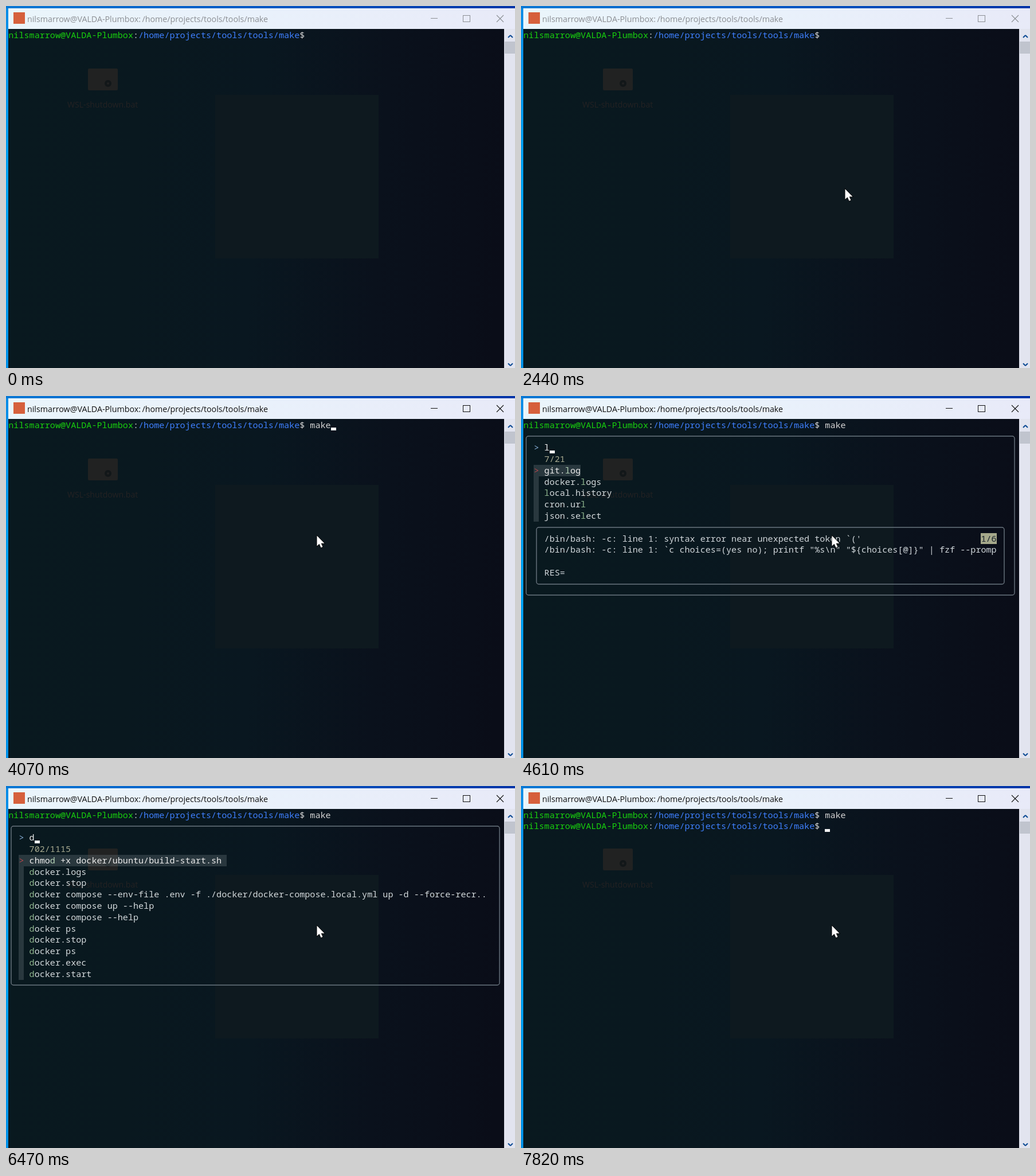
Write an HTML page with a canvas that moves like this. It is 888 by 631 pixels and loops after 8 s.

```html
<!DOCTYPE html>
<html lang="en">
<head>
<meta charset="utf-8">
<title>Terminal</title>
<style>
  html, body { margin: 0; width: 100%; height: 100%; overflow: hidden; background: #091720; }
  canvas { display: block; }
</style>
</head>
<body>
<canvas id="stage" width="888" height="631"></canvas>
<script>
const ctx = document.getElementById('stage').getContext('2d');
const LOOP = 8000, CELL = 9.07, LINE = 19.8, LEFT = 4.3, TOP = 40.5;
const MONO = '15.1px "Noto Sans Mono", monospace';
const USER = 'nilsmarrow@VALDA-Plumbox', PATH = '/home/projects/tools/tools/make';

const bashError = [
  "/bin/bash: -c: line 1: syntax error near unexpected token `('",
  '/bin/bash: -c: line 1: `c choices=(yes no); printf "%s\\n" "${choices[@]}" | fzf --promp',
  '', 'RES='];
const gitLog = ['git log --oneline --graph --all'];
const tacHistory = ['history -w; tac ~/.bash_history | fzf +s --exact | tee -a ~/.bash_history | bash'];

const tasks = ['fzf.choice', 'git.log', 'docker.logs', 'local.history', 'cron.url'];
const withL = ['git.log', 'docker.logs', 'local.history', 'cron.url', 'json.select'];
const local = ['local.history'];
const recent = ['make', 'git status', 'docker ps', 'docker.stop', 'git.log', 'cd ..', 'ls -la',
  'docker compose --help', 'cron.url', 'git pull', 'docker.start'];
const docker = ['chmod +x docker/ubuntu/build-start.sh ', 'docker.logs', 'docker.stop',
  'docker compose --env-file .env -f ./docker/docker-compose.local.yml up -d --force-recr..',
  'docker compose up --help', 'docker compose --help', 'docker ps', 'docker.stop', 'docker ps',
  'docker.exec', 'docker.start'];

// start time, query, counter, list, preview, cursor hidden
const finder = [
  [4340, '', '21/21', tasks, []],
  [4410, '', '21/21', tasks, bashError],
  [4610, 'l', '7/21', withL, bashError],
  [4680, 'l', '7/21', withL, gitLog],
  [4810, 'lo', '3/21', withL.slice(0, 3), gitLog],
  [5010, 'loc', '1/21', local, gitLog],
  [5080, 'loc', '1/21', local, tacHistory],
  [5280, 'loca', '1/21', local, tacHistory],
  [5480, 'loca', '1/21', local, tacHistory, true],
  [5940, '', '', []],
  [6010, '', '1115/1115', recent],
  [6470, 'd', '702/1115', docker],
  [6610, 'do', '215/1115', docker],
  [6740, 'doc', '118/1115', docker],
  [6810, 'dock', '118/1115', docker],
  [6880, 'dock', '112/1115', docker],
  [7080, 'dock', '112/1115', docker, null, true]];

const colX = col => LEFT + col * CELL;
const rowY = row => TOP + row * LINE;

function rect(x, y, w, h, color) {
  ctx.fillStyle = color;
  ctx.fillRect(x, y, w, h);
}

function gradient(x, y, x2, y2, ...colors) {
  const g = ctx.createLinearGradient(x, y, x2, y2);
  colors.forEach((c, i) => g.addColorStop(i / (colors.length - 1), c));
  return g;
}

function label(text, x, y, size, color) {
  ctx.font = size + 'px "Open Sans", sans-serif';
  ctx.fillStyle = color;
  ctx.fillText(text, x, y);
}

// Writes text on the character grid and returns the next column.
function put(text, col, row, color) {
  ctx.font = MONO;
  ctx.fillStyle = color;
  const y = Math.round(rowY(row) + 15.1);
  for (const ch of text) ctx.fillText(ch, colX(col++), y);
  return col;
}

function line(color, width, ...points) {
  ctx.strokeStyle = color;
  ctx.lineWidth = width;
  ctx.beginPath();
  for (let i = 0; i < points.length; i += 4) {
    ctx.moveTo(points[i], points[i + 1]);
    ctx.lineTo(points[i + 2], points[i + 3]);
  }
  ctx.stroke();
}

function frame(col, row, col2, row2) {
  const [x, x2] = [col, col2].map(c => Math.round(colX(c + .5)));
  const [y, y2] = [row, row2].map(r => Math.round(rowY(r + .5)));
  ctx.strokeStyle = '#6a757f';
  ctx.lineWidth = 1.4;
  ctx.beginPath();
  ctx.roundRect(x, y, x2 - x, y2 - y, 4);
  ctx.stroke();
}

function caret(col, row) {
  rect(Math.round(colX(col)), Math.round(rowY(row) + 14.6), 9, 5, '#f2f2f2');
}

function prompt(row) {
  let col = put(USER, 0, row, '#18d00e');
  col = put(':', col, row, '#d4d4d4');
  col = put(PATH, col, row, '#3f80ff');
  put('$', col, row, '#d4d4d4');
}

function drawWindow(active) {
  rect(0, 0, 888, 631, gradient(0, 0, 0, 631, '#0a8ce6', '#00a2f2', '#0090e8'));
  rect(0, 0, 888, 4, gradient(0, 0, 888, 0, '#0878d4', '#0458c4', '#0436a8'));
  rect(4, 4, 884, 36, gradient(4, 0, 888, 0, '#eaf5fb', '#e9f1fb', '#e8eaf8'));
  rect(4, 40, 865, 591, gradient(4, 300, 869, 360, '#09191f', '#09181f', '#091720', '#0a111c', '#0a0d18'));
  rect(365, 155, 285, 285, '#0e191f');

  ctx.fillStyle = '#212222';
  ctx.beginPath();
  ctx.roundRect(143, 109, 52, 38, 2);
  ctx.fill();
  ctx.strokeStyle = '#121719';
  ctx.lineWidth = 4;
  ctx.beginPath();
  ctx.arc(178, 135, 4, 0, 7);
  ctx.stroke();
  label('WSL-shutdown.bat', 107, 177, 14.1, '#242223');

  rect(13, 11, 20, 20, '#d6603c');
  const ink = active ? '#111' : '#8c8f94';
  label(USER + ':', 37, 28, 14.25, ink);
  label(PATH, 237.5, 28, 14.25, ink);
  line(ink, 1, 741, 21.5, 753, 21.5);
  ctx.strokeRect(797.5, 16.5, 12, 11);
  line(ink, 1.1, 856, 16, 868, 28, 868, 16, 856, 28);

  rect(869, 40, 19, 591, '#e2e4ef');
  rect(870, 62, 18, 21, '#c0c4ce');
  line('#0b4a94', 2, 876, 55, 880, 51, 880, 51, 884, 55, 876, 623, 880, 627, 880, 627, 884, 623);
}

function drawFinder([, query, info, list, preview, hidden]) {
  frame(0, 1, 94, 15);
  put('>', 2, 2, '#87afd7');
  const end = put(query, 4, 2, '#ececec');
  if (!hidden) caret(end, 2);
  put(info, 4, 3, '#a8aa90');

  list.forEach((item, i) => {
    const row = 4 + i, current = !i;
    const width = current ? item.length + 2 : 1;
    const y = Math.round(rowY(row)), bottom = Math.round(rowY(row + 1));
    rect(Math.round(colX(2)), y, Math.round(width * CELL), bottom - y, 'rgba(91, 104, 108, .4)');
    if (current) put('>', 2, row, '#b2484c');
    const at = item.indexOf(query), stop = at + query.length;
    const ink = current ? '#ececec' : '#d4dadc';
    let col = put(item.slice(0, at), 4, row, ink);
    col = put(item.slice(at, stop), col, row, current ? '#b4d2b6' : '#8db48d');
    put(item.slice(stop), col, row, ink);
  });

  if (!preview) return;
  frame(2, 9, 92, 14);
  preview.forEach((text, i) => put(text, 4, 10 + i, '#d0d6da'));
  if (preview === bashError) {
    rect(Math.round(colX(88)), Math.round(rowY(10)), 28, 19, '#a5a88a');
    put('1/6', 88, 10, '#17212a');
  }
}

// The pointer advances in discrete jumps.
function pointer(t) {
  if (t < 120) return;
  const enter = Math.min(Math.floor((t - 120) / 63.3), 3) / 3;
  const rest = (1 - enter) ** 2;
  const step = Math.min(Math.max(Math.floor((t - 2500) / 70), 0), 4) / 4;
  const move = step * step * (3 - 2 * step);
  const x = 565.5 + 237 * rest - 23 * move, y = 319 + 281 * rest - 75.5 * move;
  ctx.save();
  ctx.translate(x, y);
  const arrow = new Path2D('M0 0V18L4 14.3 7 20.8 10 19.5 7.2 13.2H13Z');
  ctx.strokeStyle = '#000';
  ctx.lineWidth = 1.5;
  ctx.stroke(arrow);
  ctx.fillStyle = '#fff';
  ctx.fill(arrow);
  ctx.restore();
}

function draw(t) {
  drawWindow(t >= 2850);
  prompt(0);
  const typed = t < 3870 ? '' : t < 3970 ? 'm' : t < 4070 ? 'mak' : 'make';
  const col = put(typed, 58, 0, '#d4d4d4');
  if (t >= 2850 && t < 2920 || t >= 3390 && t < 4340) caret(col, 0);
  if (t >= 4340 && t < 7620) drawFinder(finder.findLast(step => t >= step[0]));
  if (t >= 7690) prompt(1);
  if (t >= 7820) caret(58, 1);
  pointer(t);
}

function tick() {
  draw(performance.now() % LOOP);
  requestAnimationFrame(tick);
}
tick();
</script>
</body>
</html>
```
